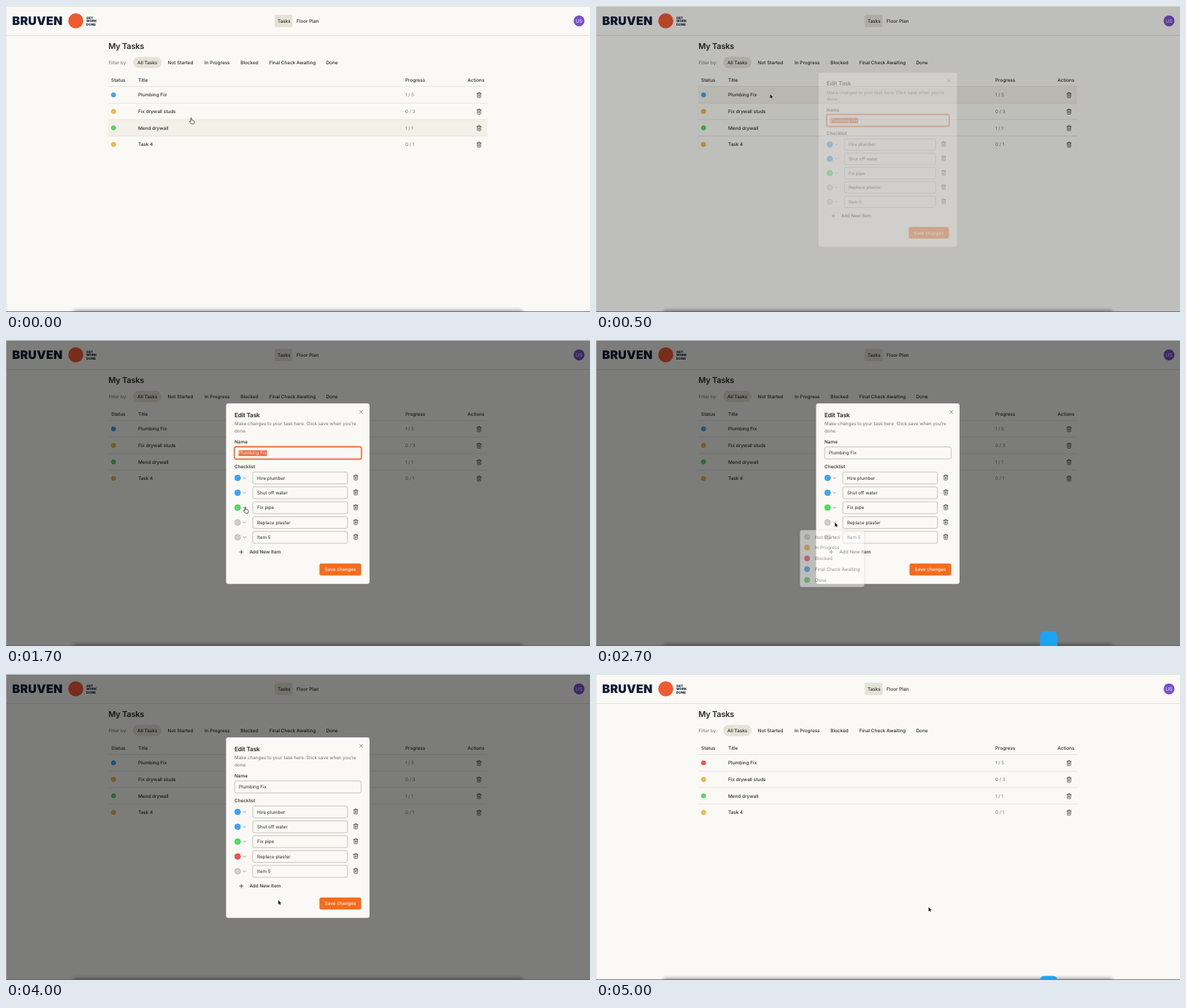
Recreate the animation shown at these times as an HTML page. Size 800 by 420 pixels, loop 5100 ms.

```html
<!DOCTYPE html>
<html lang="en">
<head>
<meta charset="utf-8">
<title>My Tasks</title>
<style>
  html, body { margin: 0; width: 100%; height: 100%; overflow: hidden; background: #faf9f5; }
  svg { display: block; width: 800px; height: 420px; }
  text { font-family: Inter, "Liberation Sans", sans-serif; text-rendering: geometricPrecision; white-space: pre; }
</style>
</head>
<body>
<svg id="stage" viewBox="0 0 800 420" xmlns="http://www.w3.org/2000/svg"></svg>
<script>
const LOOP = 5100, STEP = 100;
const INK = '#2b2a24', MUTED = '#74726b', ORANGE = '#f76b1c';
const BLUE = ['#3ea6f5', '#2d8bd6'], AMBER = ['#f5b942', '#d89a2a'], GREEN = ['#52df63', '#3cb84d'],
      GRAY = ['#d0cfca', '#a9a8a3'], RED = ['#f25252', '#d23c3c'];

const text = (x, y, str, o = {}) => {
  const { size = 6.4, weight = 500, fill = INK, anchor = 'start', gap = 0, id = '' } = o;
  return `<text ${id && `id="${id}"`} x="${x}" y="${y}" font-size="${size}" font-weight="${weight}" fill="${fill}" text-anchor="${anchor}" letter-spacing="${gap}">${str}</text>`;
};
const plain = (x, y, str, fill = INK) => text(x, y, str, { size: 6.28, weight: 400, fill });
const rect = (x, y, w, h, r, attrs) => `<rect x="${x}" y="${y}" width="${w}" height="${h}" rx="${r}" ${attrs}/>`;
const dot = (x, y, r, [fill, stroke], id = '') =>
  `<circle ${id && `id="${id}"`} cx="${x}" cy="${y}" r="${r}" fill="${fill}" stroke="${stroke}" stroke-width=".6"/>`;
const line = (d, width = .75, color = INK) =>
  `<path d="${d}" fill="none" stroke="${color}" stroke-width="${width}" stroke-linecap="round" stroke-linejoin="round"/>`;
const trash = (x, y) =>
  line(`M${x - 3} ${y - 2.3}h6M${x - 1.2} ${y - 2.4}v-.8q0-.4 .4-.4h1.6q.4 0 .4 .4v.8M${x - 2.3} ${y - 2.2}v4.8q0 .9 .9 .9h2.8q.9 0 .9-.9v-4.8M${x - .7} ${y - .6}v2.4M${x + .7} ${y - .6}v2.4`, .65);

function header() {
  const words = ['GET', 'WORK', 'DONE'];
  return rect(0, 40, 800, .8, 0, 'fill="#dddbd2"') +
    text(8.6, 26.2, 'BRUVEN', { size: 16, weight: 900, fill: '#0d1d35', gap: .2 }) +
    '<circle cx="95.6" cy="20.4" r="10.3" fill="#ef5a32"/>' +
    words.map((w, i) => text(110, 17.6 + i * 4.5, w, { size: 4.5, weight: 800, fill: '#0d1d35' })).join('') +
    rect(368, 12, 24.5, 17, 2, 'fill="#e5e3d8"') +
    text(372, 22.7, 'Tasks') + text(398, 22.7, 'Floor Plan') +
    '<circle cx="785" cy="20.4" r="7.5" fill="#7950cb"/>' +
    text(785, 22.8, 'US', { size: 6.8, weight: 400, fill: '#f1ecfb', anchor: 'middle' });
}

const rowY = i => 122 + i * 22.67;

function page() {
  const filters = [[180, 'All Tasks'], [221.6, 'Not Started'], [272, 'In Progress'], [321.2, 'Blocked'],
    [360.7, 'Final Check Awaiting'], [438.5, 'Done']];
  const heads = [[144, 'Status'], [181, 'Title'], [547, 'Progress'], [632.3, 'Actions']];
  const tasks = [['Plumbing Fix', '1 / 5', BLUE], ['Fix drywall studs', '0 / 3', AMBER],
    ['Mend drywall', '1 / 1', GREEN], ['Task 4', '0 / 1', AMBER]];
  return text(140.2, 59.4, 'My Tasks', { size: 11.1, weight: 600, gap: -.26 }) +
    plain(140.4, 79.8, 'Filter by:', MUTED) +
    rect(174, 69.7, 39, 15.5, 7.7, 'fill="#e5e3d8"') +
    filters.map(([x, s]) => text(x, 79.8, s)).join('') +
    heads.map(([x, s]) => text(x, 103.8, s)).join('') +
    rect(140.3, 110.6, 518.7, 22.6, 0, 'id="hover" fill="#f3f0e8"') +
    tasks.map(([name, done, color], i) => {
      const y = rowY(i);
      return rect(140.3, y - 11.8, 518.7, .7, 0, 'fill="#dfddd3"') +
        dot(147.3, y, 3, color, i ? '' : 'taskDot') +
        text(181, y + 2.3, name) + plain(547, y + 2.3, done, MUTED) + trash(648, y + .3);
    }).join('');
}

function dialog() {
  const items = [['Hire plumber', BLUE], ['Shut off water', BLUE], ['Fix pipe', GREEN],
    ['Replace plaster', GRAY], ['Item 5', GRAY]];
  const box = 'fill="#faf9f5" stroke="#b9b7ae" stroke-width=".8"';
  return rect(301.5, 87, 196.5, 247.7, 3, 'fill="#faf9f5"') +
    text(313, 105.7, 'Edit Task', { size: 8.3, weight: 600, gap: -.2 }) +
    line('M484.7 96.7l3.6 3.6M488.3 96.7l-3.6 3.6', .7, '#55534d') +
    plain(313, 117.4, 'Make changes to your task here. Click save when you’re', MUTED) +
    plain(313, 126.9, 'done.', MUTED) +
    text(313, 142.1, 'Name') +
    rect(313.2, 146.8, 173.4, 16.4, 2.5, box) +
    '<g id="focus">' +
      rect(312.6, 146.2, 174.6, 17.6, 3, 'fill="none" stroke="#f9a988" stroke-width="2"') +
      rect(313, 146.6, 173.8, 16.8, 2.5, 'fill="none" stroke="#ee6a38" stroke-width="1.1"') +
      rect(318.6, 151.4, 39, 7.8, 0, 'fill="#ea6b3f"') + '</g>' +
    text(319, 157.4, 'Plumbing Fix', { size: 6.28, weight: 400, id: 'name' }) +
    text(313, 176.2, 'Checklist') +
    items.map(([s, color], i) => {
      const y = 189.3 + i * 20.38;
      return dot(317.3, y, 4, color, i === 3 ? 'itemDot' : '') +
        line(`M325 ${y - .8}l1.8 1.8l1.8-1.8`, .7, '#77756e') +
        rect(338, y - 8.1, 129.8, 16.3, 2.5, box) + plain(344, y + 2.4, s) + trash(479.1, y - .6);
    }).join('') +
    line('M319.9 291h4.8M322.3 288.6v4.8', .75) + text(333.4, 293.3, 'Add New Item') +
    rect(429.4, 306.8, 57.2, 16.4, 2.5, `id="save" fill="${ORANGE}"`) +
    text(458, 317.4, 'Save changes', { fill: '#fdf6f0', anchor: 'middle' });
}

const optionY = i => 270.2 + i * 14.8;

function menu() {
  const options = [['Not Started', GRAY], ['In Progress', AMBER], ['Blocked', RED],
    ['Final Check Awaiting', BLUE], ['Done', GREEN]];
  return rect(279, 261.5, 89, 79, 3, 'fill="#000" opacity=".14" filter="url(#soft)"') +
    rect(279.6, 261, 87.8, 78, 2.5, 'fill="#fefefd" stroke="#d6d4cc" stroke-width=".6"') +
    rect(282, 0, 83.2, 14.6, 2, 'id="pick" fill="#e9e6dc"') +
    options.map(([s, color], i) => dot(289.1, optionY(i), 3.6, color) + plain(300, optionY(i) + 2.3, s)).join('');
}

const ARROW = 'M0 0V5.9L1.4 4.6L2.3 6.6L3.2 6.2L2.3 4.3H4.2Z';
const HAND = 'M-.6 .7Q-.6 0 .1 0T.8 .7V3.1L3.5 3.7Q4.5 4 4.4 5L4 7.6Q3.9 8.3 3.2 8.3H.6Q0 8.3-.4 7.7L-2.1 5.3Q-2.5 4.6-2 4.3Q-1.5 4.1-.6 5Z';

document.getElementById('stage').innerHTML =
  '<defs><filter id="soft" x="-20%" y="-400%" width="140%" height="900%"><feGaussianBlur stdDeviation="2.4"/></filter></defs>' +
  rect(0, 0, 800, 420, 0, 'fill="#faf9f5"') + header() + page() +
  rect(0, 0, 800, 420, 0, 'id="dim" fill="#000"') +
  `<g id="dialog">${dialog()}</g><g id="menu">${menu()}</g>` +
  rect(92, 417.5, 616, 10, 4, 'fill="#000" opacity=".38" filter="url(#soft)"') +
  rect(0, 0, 800, .8, 0, 'fill="#dddcd9"') + rect(0, 0, .6, 420, 0, 'fill="#dddcd9" opacity=".7"') +
  rect(0, 419.2, 800, .8, 0, 'fill="#5d605c"') +
  rect(608.2, 0, 23.8, 23.8, 5.4, 'id="app" fill="#1ba4f4"') +
  `<g id="cursor"><path id="arrow" d="${ARROW}" fill="#111" stroke="#fff" stroke-width=".8" paint-order="stroke"/>` +
  `<path id="hand" d="${HAND}" fill="#fff" stroke="#222" stroke-width=".75" stroke-linejoin="round"/></g>`;

const el = {};
document.querySelectorAll('#stage [id]').forEach(n => el[n.id] = n);
const set = (id, attrs) => { for (const k in attrs) el[id].setAttribute(k, attrs[k]); };
const show = (id, on) => set(id, { opacity: +on });
const paint = (id, [fill, stroke]) => set(id, { fill, stroke });

// [time, x, y]
const moves = [[0, 253.5, 153.6], [100, 250, 143], [200, 242, 127], [300, 238.5, 121], [600, 238.5, 121],
  [1200, 304, 158], [1500, 325, 223], [1600, 327.7, 229.5], [1900, 327.7, 229.5], [2200, 327.5, 233],
  [2300, 327.5, 233], [2500, 327.5, 250], [2900, 327, 251], [3100, 324, 268], [3300, 321, 291],
  [3500, 318, 299], [3700, 318, 299], [4300, 428, 322], [4600, 455.6, 320], [LOOP, 455.6, 320]];
// [time, opacity, scale] of the dialog, [time, opacity] of the dimming
const fade = [[400, 0, .955], [500, .3, .964], [600, .93, .996], [700, 1, 1], [4700, 1, 1], [4800, .4, .97], [4900, 0, .95]];
const shade = [[400, 0], [500, .24], [600, .5], [4700, .5], [4800, .22], [4900, 0]];
// [mid time, half length, height] of each hop
const hops = [[880, 300, 20], [1430, 260, 6.5], [2710, 320, 20], [3335, 300, 6.5], [4720, 330, 20]];

function at(keys, t) {
  if (t <= keys[0][0]) return keys[0].slice(1);
  for (let i = 1; i < keys.length; i++) {
    const a = keys[i - 1], b = keys[i];
    if (t <= b[0]) {
      const p = (t - a[0]) / (b[0] - a[0]);
      return a.slice(1).map((v, k) => v + (b[k + 1] - v) * p);
    }
  }
  return keys[keys.length - 1].slice(1);
}

function draw(t) {
  const [x, y] = at(moves, t);
  set('cursor', { transform: `translate(${x} ${y})` });
  const hand = t < 500 || (t >= 1500 && t < 2700);
  show('hand', hand);
  show('arrow', !hand);

  const row = t < 100 ? 2 : t < 200 ? 1 : 0;
  set('hover', { y: rowY(row) - 11.4 });
  show('hover', t < 600);
  paint('taskDot', t >= 4800 ? RED : BLUE);

  const [alpha, scale] = at(fade, t);
  set('dim', { opacity: at(shade, t)[0] });
  set('dialog', { opacity: alpha, transform: `translate(399.75 210.85) scale(${scale}) translate(-399.75 -210.85)` });
  const focused = t < 2700;
  show('focus', focused);
  set('name', { fill: focused ? '#fdeee6' : INK });
  paint('itemDot', t >= 3800 ? RED : GRAY);
  set('save', { fill: t >= 4400 ? '#f97d3e' : ORANGE });

  set('menu', { opacity: t < 2700 || t >= 3800 ? 0 : t < 2800 ? .5 : 1 });
  const option = Math.floor((y - 262.8) / 14.8);
  set('pick', { y: optionY(option) - 7.3, opacity: +(option >= 0) });

  const lift = Math.max(0, ...hops.map(([mid, half, h]) => h * (1 - ((t - mid) / half) ** 2)));
  set('app', { y: 420 - lift });
}

const start = performance.now();
function tick() {
  const t = (performance.now() - start) % LOOP;
  draw(Math.floor(t / STEP) * STEP);
  requestAnimationFrame(tick);
}
draw(0);
requestAnimationFrame(tick);
</script>
</body>
</html>
```
